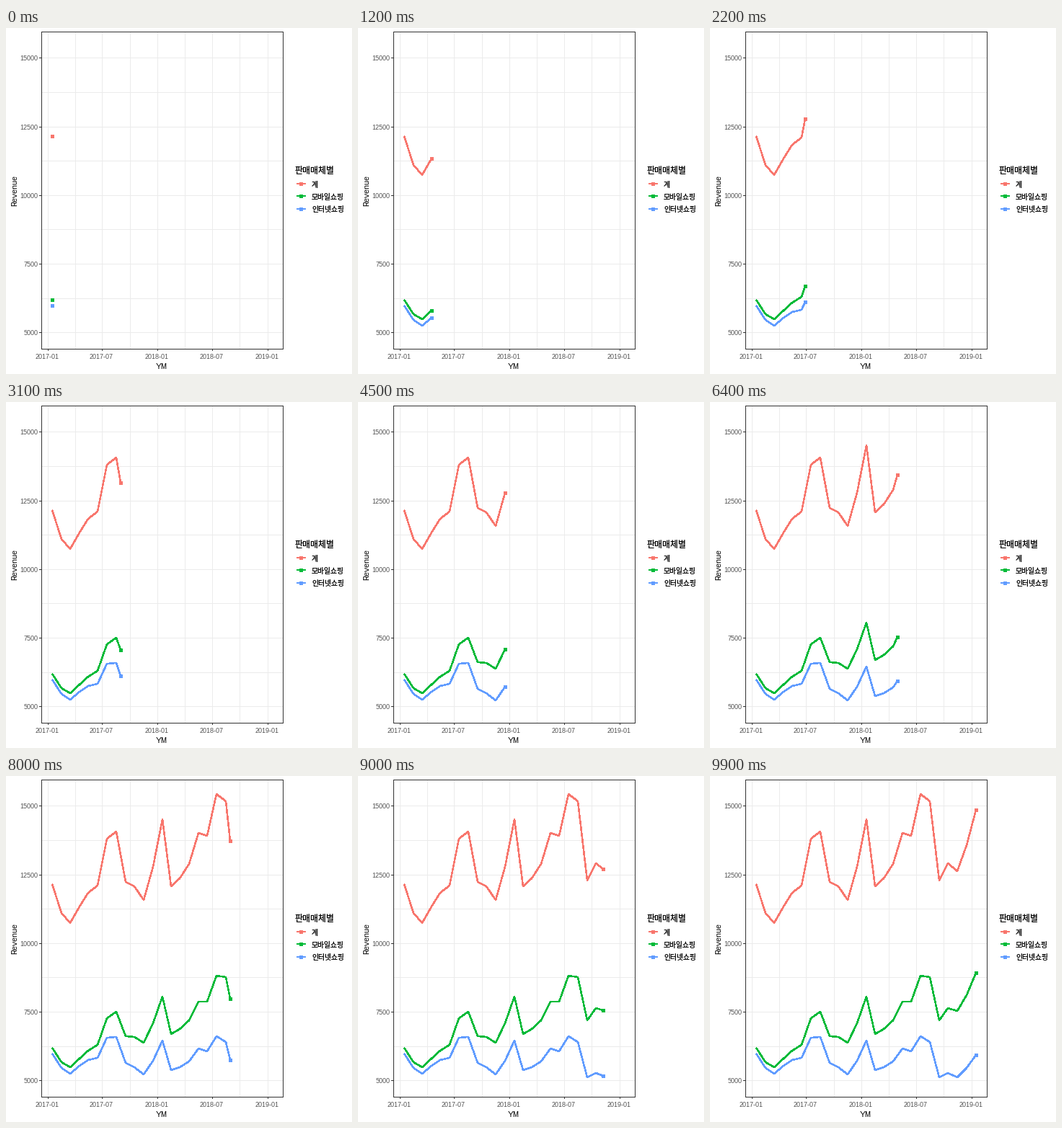
These frames come from a looping animation (480 px wide and 480 px high, 10 s). A matplotlib script:

```python
import numpy as np
import matplotlib.pyplot as plt
from matplotlib.animation import FuncAnimation
from matplotlib.patches import Circle

plt.rcParams.update({"text.hinting": "native", "text.hinting_factor": 1})

SIZE, DPI = 480, 96
PT = 72 / DPI                      # points per pixel
FRAMES, INTERVAL = 100, 100
LEFT, TOP, RIGHT, BOTTOM = 49.5, 5.5, 384.5, 445.0
SANS, HANGUL = "Liberation Sans", "Noto Sans CJK JP"

# Key points of the total, one per month; the mobile share follows a rising
# trend with a yearly wave, and the internet share is what remains.
total = np.array([
    12150, 11100, 10730, 11330, 11820, 12100, 13800, 14060, 12230, 12080,
    11580, 12790, 14500, 12060, 12350, 12880, 14010, 13910, 15430, 15170,
    12290, 12910, 12630, 13560, 14850])
i = np.arange(len(total))
mobile = total * (0.506 + 0.0038 * i + 0.006 * np.cos(np.pi * (i - 10) / 6))
series = [("계", "#F8766D", total),
          ("모바일쇼핑", "#00BA38", mobile),
          ("인터넷쇼핑", "#619CFF", total - mobile)]

months = np.arange("2017-01", "2019-02", dtype="datetime64[M]")
month_start = (months.astype("datetime64[D]")
               - np.datetime64("2017-01-01")).astype(int)
days = month_start + 15
keys = np.round((FRAMES - 1) * month_start / month_start[-1])


def make_scale(lo, hi, start, end):
    """Map lo..hi onto start..end with 5 % padding at both sides."""
    pad = 0.05 * (hi - lo)
    return lambda v: start + (v - lo + pad) / (hi - lo + 2 * pad) * (end - start)


sx = make_scale(days[0], days[-1], LEFT, RIGHT)
sy = make_scale(4940, total.max(), BOTTOM, TOP)

fig = plt.figure(figsize=(SIZE / DPI, SIZE / DPI), dpi=DPI, facecolor="white")
ax = fig.add_axes([0, 0, 1, 1])
ax.set(xlim=(0, SIZE), ylim=(SIZE, 0))
ax.axis("off")


def line(xs, ys, color, width=1.0, z=1):
    return ax.plot(xs, ys, color=color, lw=width * PT, zorder=z, snap=False,
                   antialiased=False, solid_capstyle="butt",
                   solid_joinstyle="round")[0]


def dot(x, y, color):
    return ax.add_patch(Circle((x, y), 2.5, fc=color, ec="none", zorder=4,
                               antialiased=False, snap=False))


def label(x, y, s, size, color="black", font=SANS, **kw):
    ax.text(x, y, s, fontsize=size * PT, color=color, family=font,
            va="baseline", **kw)


def pixel(v):
    return np.floor(v) + 0.5


def mid(v):
    return (v[1:] + v[:-1]) / 2


# Grid, ticks and axis labels
x_breaks = month_start[::6]
y_breaks = np.arange(5000, 15001, 2500)
for d in [*mid(x_breaks), *x_breaks]:
    line([pixel(sx(d))] * 2, [TOP, BOTTOM], "#EBEBEB")
for v in [*mid(y_breaks), *y_breaks]:
    line([LEFT, RIGHT], [pixel(sy(v))] * 2, "#EBEBEB")

for d, month in zip(x_breaks, months[::6]):
    x = pixel(sx(d))
    line([x, x], [445, 448], "#333333")
    label(x - 1, 459, str(month), 9, "#4D4D4D", ha="center")
for v in y_breaks:
    y = pixel(sy(v))
    line([46, 49], [y, y], "#333333")
    label(44.5, y + 3.5, str(v), 9, "#4D4D4D", ha="right")

bottom = pixel(BOTTOM)
line([LEFT, RIGHT, RIGHT, LEFT, LEFT], [TOP, TOP, bottom, bottom, TOP],
     "#333333", z=5)
label(216, 473, "YM", 11, ha="center")
label(15, 225.5, "Revenue", 11, ha="center", rotation=90,
      rotation_mode="anchor")

# Legend
label(401, 202, "판매매체별", 11.95, font=HANGUL)
for row, (name, color, _) in enumerate(series):
    y = np.floor(216.5 + 17.28 * row)
    line([403, 416], [y, y], color, 1.5)
    dot(409.5, y + 0.5, color)
    label(424, y + 4.5, name, 9.8, font=HANGUL)

lines = [line([], [], color, 1.5, 3) for _, color, _ in series]
dots = [dot(0, 0, color) for _, color, _ in series]


def update(frame):
    seen = keys <= frame
    px = np.floor(sx(np.append(days[seen], np.interp(frame, keys, days))))
    for ln, pt, (_, _, values) in zip(lines, dots, series):
        head = np.interp(frame, keys, values)
        py = np.floor(sy(np.append(values[seen], head)))
        ln.set_data(px, py)
        pt.center = px[-1] + 0.5, py[-1] + 0.5
    return lines + dots


anim = FuncAnimation(fig, update, frames=FRAMES, interval=INTERVAL,
                     repeat=True, repeat_delay=0)
plt.show()
```
